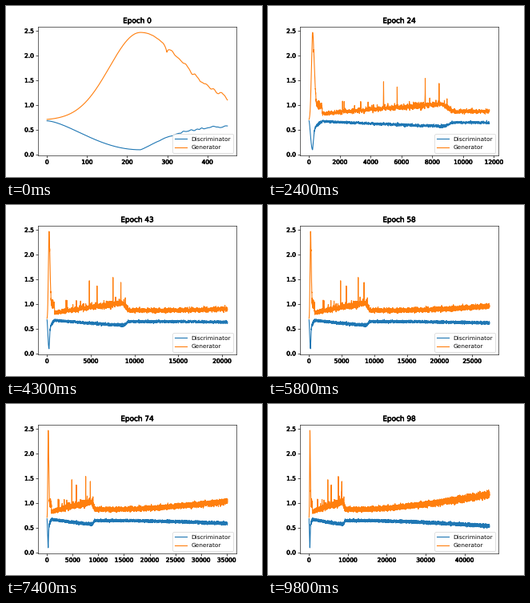
Recreate the animation shown at these times as a matplotlib script. Size 320x214 px, loop 9.9 s.

```python
import numpy as np
import matplotlib.pyplot as plt
from matplotlib.animation import FuncAnimation
from matplotlib.patheffects import withStroke

W, H, DPI = 320, 214, 64
EPOCHS, BATCHES, LAST_LOG = 99, 469, 450
PEAK = 233  # step where the two losses are furthest apart
K = 5 / 6  # default point sizes, scaled to this dpi

plt.rcParams.update({
    "font.family": "DejaVu Sans",
    "font.size": 10 * K,
    "text.hinting": "none",
    "axes.titlesize": 12 * K,
    "axes.titlepad": 6 * K,
    "axes.linewidth": 0.8 * K,
    "lines.linewidth": 1.5 * K,
    "patch.linewidth": 1.0 * K,
})
for axis in ("xtick", "ytick"):
    plt.rcParams.update({
        f"{axis}.major.size": 3.5 * K,
        f"{axis}.major.width": 0.9 * K,
        f"{axis}.major.pad": 3.5 * K,
    })

BOLD = [withStroke(linewidth=0.65, foreground="black")]
rng = np.random.default_rng(7)
t = np.arange(BATCHES * (EPOCHS - 1) + LAST_LOG + 1)


def ramp(start, end):
    return np.clip((t - start) / (end - start), 0, 1)


def switch(centre, width):
    """Smooth step from 0 to 1."""
    return 0.5 + 0.5 * np.tanh((t - centre) / (2 * width))


def bell(centre, width):
    return np.exp(-0.5 * ((t - centre) / width) ** 2)


def spike(centre, height, width=8):
    return height * np.exp(-np.abs(t - centre) / width)


def noise(length=13):
    """Unit-variance noise, correlated over a few steps."""
    kernel = np.hanning(length + 2)
    raw = rng.standard_normal(t.size)
    return np.convolve(raw, kernel / np.linalg.norm(kernel), "same")


def drift(bump, rest, growth):
    """Slow rise, a quick return to rest, then a long accelerating rise."""
    back = switch(9050, 130)
    late = rest + growth * ramp(14000, t[-1]) ** 1.5
    return bump * ramp(900, 8500) ** 0.9 * (1 - back) + late * back


def generator_loss():
    rise = 0.69 + 1.78 * bell(PEAK, 77)
    fall = 0.97 + 1.50 * bell(PEAK, 104) - 0.15 * switch(855, 10)
    slow = drift(0.19, 0.05, 0.31)
    sigma = (0.018 + 0.04 * slow + 0.03 * bell(640, 130)) * switch(310, 25)
    loss = np.where(t < PEAK, rise, fall) + slow + sigma * noise()
    loss -= spike(299, 0.12, 4)
    loss += spike(5720, 0.37) + spike(8440, 0.44)
    for centre in rng.uniform(1200, 9000, 45):
        loss += spike(centre, rng.exponential(0.07))
    return loss


def discriminator_loss():
    sink = 0.68 - 0.586 * np.sin(np.pi / 2 * ramp(0, PEAK) ** 0.78) ** 2
    since_peak = np.maximum(t - PEAK, 0) / 95
    recover = 0.094 + 0.52 * (1 - np.exp(-since_peak ** 1.2))
    recover += 0.056 * switch(720, 45)
    slow = drift(0.1, 0.025, 0.11)
    sigma = (0.01 + 0.04 * slow + 0.008 * bell(560, 130)) * switch(290, 15)
    return np.where(t < PEAK, sink, recover) - slow + sigma * noise()


fig, ax = plt.subplots(figsize=(W / DPI, H / DPI), dpi=DPI)
fig.subplots_adjust(left=0.125, right=0.9, bottom=0.125, top=0.88)
curves = [
    (ax.plot([], [], color=color, label=label)[0], loss)
    for label, color, loss in (
        ("Discriminator", "#1f77b4", discriminator_loss()),
        ("Generator", "#ff7f0e", generator_loss()),
    )
]
ax.set_ylim(-0.025, 2.59)
ax.legend(loc="lower right")
title = ax.set_title("Epoch 0", path_effects=BOLD)


def draw(epoch):
    last = BATCHES * epoch + LAST_LOG
    for line, loss in curves:
        line.set_data(t[:last + 1], loss[:last + 1])
    ax.set_xlim(-0.05 * last, 1.05 * last)
    title.set_text(f"Epoch {epoch}")
    for label in ax.get_xticklabels() + ax.get_yticklabels():
        label.set_path_effects(BOLD)
    return [line for line, _ in curves] + [title]


anim = FuncAnimation(fig, draw, frames=EPOCHS, interval=100,
                     init_func=lambda: draw(0), repeat=True, repeat_delay=0)
plt.show()
```
